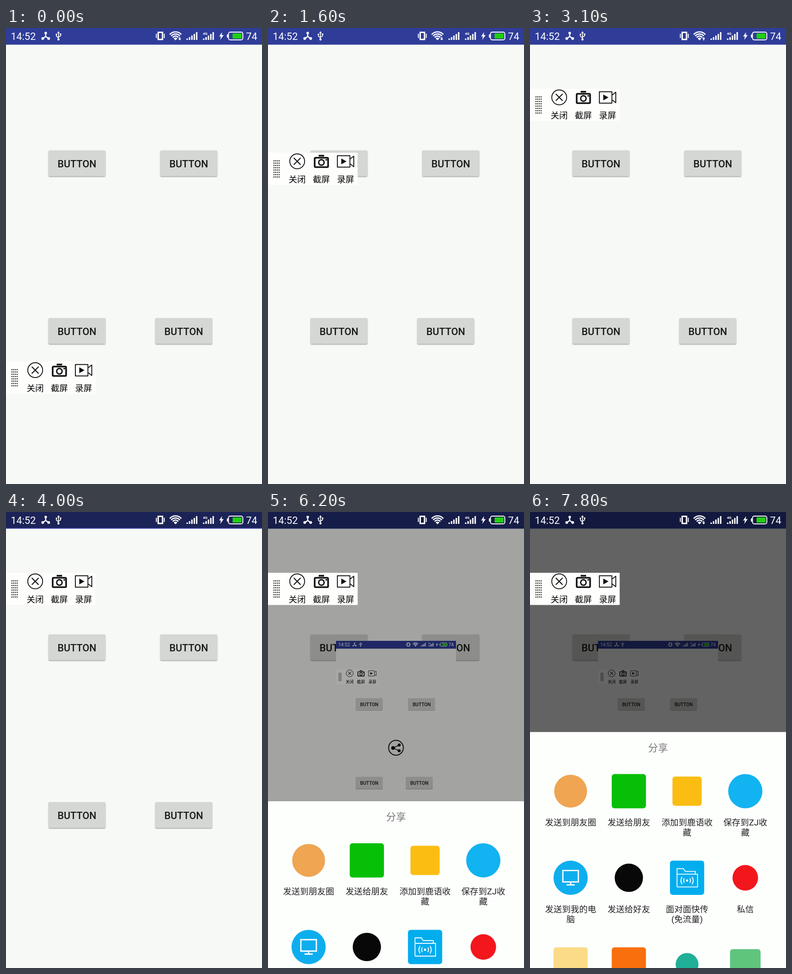
Write an HTML page that moves like this. It is 561 by 998 pixels and loops after 8000 ms.

```html
<!DOCTYPE html>
<html lang="zh">
<head>
<meta charset="utf-8">
<title>Floating toolbar and share sheet</title>
<style>
html, body { margin: 0; width: 100%; height: 100%; overflow: hidden; background: #f7f9f6; }
svg { display: block; width: 561px; height: 998px; }
text { font-family: Roboto, "Noto Sans CJK SC", "Noto Sans CJK", sans-serif; }
.mid { text-anchor: middle; }
.cjk { font-family: "Noto Sans CJK SC", "Noto Sans CJK", sans-serif; font-size: 18.7px; }
.label { font-family: Roboto, "Noto Sans CJK SC", "Noto Sans CJK", sans-serif; font-size: 18.7px; fill: #222; }
.btn { font-size: 21.8px; font-weight: 500; fill: #161816; }
.line { fill: none; stroke: #111; }
.white { fill: none; stroke: #fff; }
</style>
</head>
<body>
<svg viewBox="0 0 561 998">
  <defs>
    <filter id="soft" x="-10%" y="-20%" width="120%" height="150%"><feGaussianBlur stdDeviation="1.3"/></filter>
    <clipPath id="wifiFan"><path d="M371.500 27 L354 9.500 L360 3 H383 L389 9.500 Z"/></clipPath>

    <g id="icons" fill="#fff">
      <text x="10.500" y="25.700" font-size="22">14:52</text>
      <path class="white" stroke-width="2.500" d="M87 11V18.500L80 23.500M87 18.500L94 23.500"/>
      <circle cx="87" cy="11" r="2.800"/><circle cx="80.500" cy="23" r="3"/><circle cx="93.500" cy="23" r="3"/>
      <path class="white" stroke-width="1.700" d="M115 10V25M110.500 14V18L115 21.500M119.500 13V17.500L115 20"/>
      <path d="M115 7L118 11.500H112Z"/><circle cx="115" cy="25" r="2.400"/>
      <circle cx="110.500" cy="14" r="1.700"/><rect x="118" y="12" width="3.200" height="3.200"/>
      <rect class="white" stroke-width="3" x="333.500" y="9.500" width="9.500" height="15.500"/>
      <path class="white" stroke-width="2" d="M329.500 12.500V22M346.800 12.500V22"/>
      <g clip-path="url(#wifiFan)">
        <circle cx="371.500" cy="25.500" r="4.500"/>
        <g class="white" stroke-width="2.700">
          <circle cx="371.500" cy="25.500" r="7.800"/><circle cx="371.500" cy="25.500" r="12.400"/><circle cx="371.500" cy="25.500" r="17"/>
        </g>
      </g>
      <g id="bars"></g>
      <text x="431.500" y="14.500" font-size="8" font-weight="700">4G</text>
      <path d="M473.500 9L467 18.500H471L469.500 26L477 15.500H472.500Z"/>
      <rect class="white" stroke-width="1.900" x="487.500" y="9" width="31.500" height="17" rx="4"/>
      <rect x="484" y="14" width="3" height="7" rx="1"/>
      <rect x="496.500" y="11.800" width="20" height="11.500" rx="1.500" fill="#20cf0e"/>
      <text x="526" y="25.700" font-size="22">74</text>
    </g>

    <g id="screen">
      <rect width="561" height="998" fill="#f7f9f6"/>
      <rect width="561" height="36.500" fill="#2f3d99"/>
      <g id="buttons"></g>
    </g>

    <g id="tools">
      <rect width="196.500" height="70.500" fill="#fefffd"/>
      <g id="grip" fill="#222"></g>
      <circle class="line" cx="64" cy="18.800" r="16.300" stroke-width="1.900"/>
      <path class="line" stroke-width="2.200" d="M56.500 11.300L71.500 26.300M71.500 11.300L56.500 26.300"/>
      <rect class="line" stroke-width="3.600" x="102.300" y="11" width="29.400" height="20.500" rx="2"/>
      <rect x="111" y="4.700" width="12" height="3.600" fill="#111"/>
      <circle class="line" cx="117" cy="21.200" r="6" stroke-width="3"/>
      <rect x="126" y="14" width="3.500" height="3" fill="#111"/>
      <path class="line" stroke-width="1.900" stroke-linejoin="round" d="M152 6.500H179.500V31.500H152ZM179.500 14L188 7.500V30.500L179.500 24"/>
      <path fill="#111" d="M160.500 12.500L172 19L160.500 25.500Z"/>
      <text class="cjk mid" x="64" y="65">关闭</text>
      <text class="cjk mid" x="117" y="65">截屏</text>
      <text class="cjk mid" x="170" y="65">录屏</text>
    </g>
  </defs>

  <use href="#screen"/>
  <g id="preview">
    <g transform="translate(149 282) scale(.4688)">
      <use href="#screen"/><use href="#icons"/><use href="#tools" y="133"/>
    </g>
    <circle class="line" cx="280.500" cy="516" r="16.200" stroke-width="2"/>
    <path class="line" stroke-width="1.800" d="M287.500 510L274 516.500L287.500 522.500"/>
    <g fill="#111"><circle cx="274" cy="516.500" r="4"/><circle cx="287.500" cy="510" r="3.300"/><circle cx="287.500" cy="522.500" r="3.300"/></g>
  </g>
  <rect id="dim" y="36.500" width="561" height="962"/>
  <rect id="barDim" width="561"/>
  <use href="#icons"/>
  <path id="arrow" fill="#fff"/>
  <g id="sheet">
    <rect y="-1" width="561" height="2" fill="#000" opacity=".12"/>
    <rect width="561" height="998" fill="#fdfffd"/>
    <text class="mid" x="280.500" y="42" font-size="21.800" fill="#777">分享</text>
    <g id="apps"></g>
  </g>
  <use id="panel" href="#tools"/>
</svg>
<script>
const $ = id => document.getElementById(id);
const clamp = v => Math.max(0, Math.min(1, v));
const rect = (x, y, w, h, more = '') => `<rect x="${x}" y="${y}" width="${w}" height="${h}" ${more}/>`;

$('buttons').innerHTML = [[93, 268], [338, 268], [93, 635], [327, 635]].map(([x, y]) =>
  rect(x, y + 1.5, 125, 56.5, 'rx="3" fill="#000" opacity=".32" filter="url(#soft)"') +
  rect(x, y - .3, 125, 56.5, 'rx="2.5" fill="#d5d7d4"') +
  `<text class="btn mid" x="${x + 62.5}" y="${y + 36.8}">BUTTON</text>`).join('');

const bars = (x, heights) => heights.map((h, i) => rect(x + i * 5.2, 26 - h, 3.1, h)).join('');
$('bars').innerHTML = bars(395.5, [3, 6, 9.5, 13, 17]) + bars(431.7, [3, 6, 9.5, 13, 17]);

let dots = '';
for (let i = 0; i < 32; i++) dots += rect(12 + i % 4 * 3.8, 16.5 + (i >> 2) * 5.05, 2.2, 2.4);
$('grip').innerHTML = dots;

// Each app: shape, size, colour, label lines, optional pictogram.
const monitor = '<path class="white" stroke-width="2.800" d="M-17 -16H17V9H-17ZM0 9V15M-9 15.500H9"/>';
const folder = '<path class="white" stroke-width="1.800" d="M-22 20V-20H-8L-4 -14H18V-8M-22 -8H23V20H-22"/>' +
  '<g class="white" stroke-width="2"><path d="M-6 1Q-9 6 -6 11M6 1Q9 6 6 11M-11 -2Q-16 6 -11 14M11 -2Q16 6 11 14"/></g><circle cy="6" r="2.500" fill="#fff"/>';
const apps = [
  ['o', 72, '#efa552', ['发送到朋友圈']],
  ['s', 75, '#08bf08', ['发送给朋友']],
  ['s', 64, '#fbbd12', ['添加到鹿语收', '藏']],
  ['o', 75, '#12b3f1', ['保存到ZJ收', '藏']],
  ['o', 75, '#0eaeee', ['发送到我的电', '脑'], monitor],
  ['o', 62, '#080808', ['发送给好友']],
  ['s', 75, '#02adee', ['面对面快传', '(免流量)'], folder],
  ['o', 56, '#f3161d', ['私信']],
  ['s', 75, '#fbdb88', []],
  ['s', 75, '#f8700e', []],
  ['o', 50, '#20af97', []],
  ['s', 67, '#5fc57d', []]
];
$('apps').innerHTML = apps.map(([kind, size, fill, lines, art = ''], i) => {
  const r = size / 2;
  const shape = kind === 'o' ? `<circle r="${r}" fill="${fill}"/>` : rect(-r, -r, size, size, `rx="6" fill="${fill}"`);
  const label = lines.map((s, n) => `<text class="label mid" y="${75 + n * 22}">${s}</text>`).join('');
  return `<g transform="translate(${89 + i % 4 * 127.6} ${129.5 + (i >> 2) * 189.6})">${shape}${art}${label}</g>`;
}).join('');

// Toolbar height while it is dragged: [time, y].
const drag = [[0, 730], [200, 749], [400, 600], [700, 282], [850, 262], [1200, 505], [1600, 273],
  [1750, 255], [2100, 412], [2500, 290], [2700, 174], [2900, 145], [3100, 133], [8000, 133]];
const slope = i => (drag[i + 1][1] - drag[i][1]) / (drag[i + 1][0] - drag[i][0]);
function tangent(i) {
  if (i < 1 || i > drag.length - 2) return 0;
  const a = slope(i - 1), b = slope(i);
  return a * b > 0 ? 2 * a * b / (a + b) : 0;
}
function panelY(t) {
  const i = Math.max(0, drag.findIndex(k => k[0] > t) - 1);
  const [t0, y0] = drag[i], [t1, y1] = drag[i + 1];
  const d = t1 - t0, u = (t - t0) / d, v = 1 - u;
  return y0 * (1 + 2 * u) * v * v + y1 * u * u * (3 - 2 * u) + d * u * v * (tangent(i) * v - tangent(i + 1) * u);
}

const down = 'M379.500 20H381.800V23.500H384L380.600 27L377.200 23.500H379.500Z';
const up = 'M379.500 27H381.800V23.500H384L380.600 20L377.200 23.500H379.500Z';
function wifiArrow(t) {
  if (t < 1900) return down;
  if (t < 3700) return up;
  return t >= 4800 && t < 5800 || t >= 7600 ? down : '';
}

function draw(time) {
  const t = Math.floor(time / 100) * 100;
  const dim = .6 * clamp((t - 6000) / 350);
  $('panel').setAttribute('y', panelY(t).toFixed(1));
  $('arrow').setAttribute('d', wifiArrow(t));
  $('preview').setAttribute('opacity', clamp((t - 4000) / 300));
  $('dim').setAttribute('opacity', dim);
  $('barDim').setAttribute('height', t <= 4000 ? 34.5 : 36.5);
  $('barDim').setAttribute('opacity', t < 3900 ? 0 : t < 4000 ? .25 : .43 + dim * .28);
  const rise = 1 - Math.pow(1 - clamp((t - 6000) / 500), 2.41);
  $('sheet').setAttribute('transform', `translate(0 ${(1000 - 518.5 * rise).toFixed(1)})`);
}

const start = performance.now();
function tick() {
  draw((performance.now() - start) % 8000);
  requestAnimationFrame(tick);
}
tick();
</script>
</body>
</html>
```
